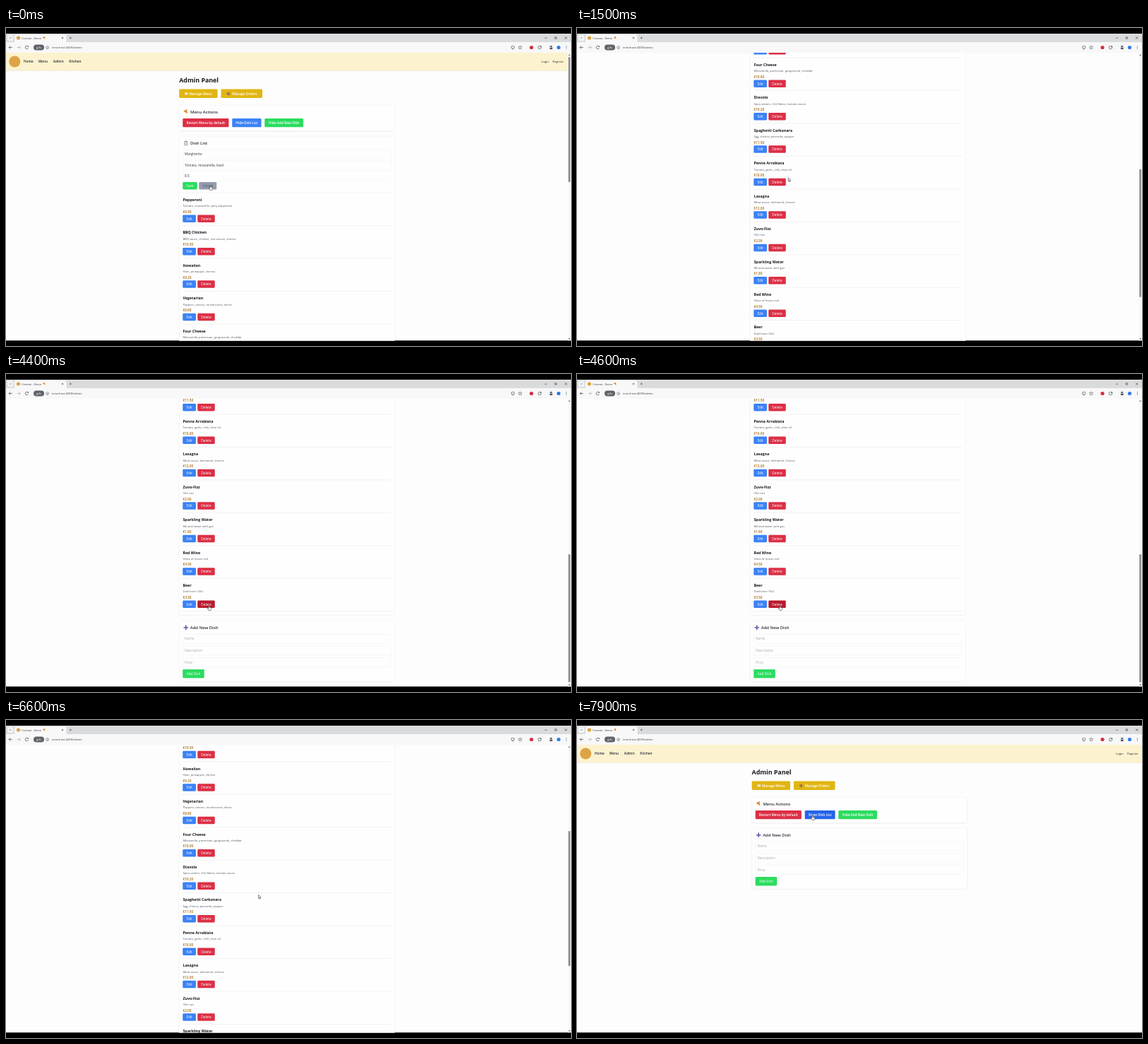
Recreate the animation shown at these times as an HTML page with a canvas. Size 800 by 450 pixels, loop 8000 ms.

```html
<!DOCTYPE html>
<html lang="en">
<head>
<meta charset="utf-8">
<title>Admin Panel</title>
<style>
html, body { margin: 0; width: 100%; height: 100%; overflow: hidden; background: #000; }
canvas { display: block; width: 800px; height: 450px; }
</style>
</head>
<body>
<canvas id="stage" width="800" height="450"></canvas>
<script>
const ctx = document.getElementById('stage').getContext('2d');
const LOOP = 8000, STEP = 100;
const TOP = 35, BOTTOM = 442.5, PITCH = 46.44;
const SMALL = 4.13, BODY = 4.72, LARGE = 5.3, HEADING = 5.9;
const HOST = 'innerhost:4200';
const RED = '#dc2f45', BLUE = '#3b82f6', GREEN = '#2bdc5f', YELLOW = '#e1b512', GRAY = '#9ca3af';
const HOVER = { [RED]: '#b91c2f', [BLUE]: '#2563eb', [GREEN]: '#20b851', [YELLOW]: '#c99c0c', [GRAY]: '#949cab' };
const INK = '#1b1f27';

const dishes = [
  ['Margherita', 'Tomato, mozzarella, basil', '8.50'],
  ['Pepperoni', 'Tomato, mozzarella, spicy pepperoni', '9.90'],
  ['BBQ Chicken', 'BBQ sauce, chicken, red onions, cheese', '10.50'],
  ['Hawaiian', 'Ham, pineapple, cheese', '9.20'],
  ['Vegetarian', 'Peppers, onions, mushrooms, olives', '8.80'],
  ['Four Cheese', 'Mozzarella, parmesan, gorgonzola, cheddar', '10.00'],
  ['Diavola', 'Spicy salami, chili flakes, tomato sauce', '10.20'],
  ['Spaghetti Carbonara', 'Egg, cheese, pancetta, pepper', '11.50'],
  ['Penne Arrabiata', 'Tomato, garlic, chili, olive oil', '10.00'],
  ['Lasagna', 'Meat sauce, béchamel, cheese', '12.00'],
  ['Zuvo-Fizz', '33cl can', '2.00'],
  ['Sparkling Water', 'Mineral water with gas', '1.80'],
  ['Red Wine', 'Glass of house red', '4.50'],
  ['Beer', 'Draft beer 50cl', '3.50']
];

// Timeline: [time, value...]
const scrollKeys = [[0, 0], [700, 0], [900, 58.2], [1750, 481], [5999, 481], [6000, 434.6], [6250, 434.6], [6600, 247], [7050, 0]];
const cursorKeys = [
  [0, 289.5, 223], [300, 289.5, 223], [800, 292.5, 215], [1800, 302, 210.5], [2200, 262, 309],
  [2500, 273.8, 395], [3100, 285, 408], [3500, 276, 380], [4200, 287.5, 328], [4700, 287.5, 328],
  [5600, 445, 69], [6000, 445, 69], [6400, 357.5, 247.5], [6950, 357.5, 247.5], [7500, 333.5, 135]
];
const CANCEL_AT = 300, ALERT_AT = 4800, CLOSE_AT = 6000, HIDE_AT = 7900;

const pointer = { x: 0, y: 0, kind: 'arrow', active: true };
let scroll = 0;

function sample(keys, t) {
  const next = keys.findIndex(k => k[0] > t);
  if (next < 0) return keys[keys.length - 1].slice(1);
  const a = keys[next - 1], b = keys[next], p = (t - a[0]) / (b[0] - a[0]);
  return a.slice(1).map((v, i) => v + (b[i + 1] - v) * p);
}

function text(str, x, cy, size, color = INK, weight = 400, align = 'left') {
  ctx.font = `${weight} ${size}px "Open Sans", "Noto Sans", sans-serif`;
  ctx.fillStyle = color;
  ctx.textAlign = align;
  ctx.fillText(str, x, cy + size * 0.36);
}

function box(x, y, w, h, r, fill, stroke, width = 0.5) {
  ctx.beginPath();
  ctx.roundRect(x, y, w, h, r);
  if (fill) { ctx.fillStyle = fill; ctx.fill(); }
  if (stroke) { ctx.strokeStyle = stroke; ctx.lineWidth = width; ctx.stroke(); }
}

function disc(x, y, r, fill) {
  ctx.beginPath();
  ctx.arc(x, y, r, 0, Math.PI * 2);
  ctx.fillStyle = fill;
  ctx.fill();
}

function poly(points, fill, stroke, width = 0.6) {
  ctx.beginPath();
  points.forEach(([x, y]) => ctx.lineTo(x, y));
  if (fill) { ctx.closePath(); ctx.fillStyle = fill; ctx.fill(); }
  if (stroke) { ctx.strokeStyle = stroke; ctx.lineWidth = width; ctx.stroke(); }
}

const line = (x1, y1, x2, y2, color, width) => poly([[x1, y1], [x2, y2]], null, color, width);

function hit(x, y, w, h, kind) {
  const py = pointer.y + scroll;
  const inside = pointer.active && pointer.x >= x && pointer.x <= x + w && py >= y && py <= y + h;
  if (inside) pointer.kind = kind;
  return inside;
}

function button(label, x, y, w, h, color, { weight = 400, ink = '#fff', shift = 0 } = {}) {
  const over = hit(x, y, w, h, 'hand');
  box(x, y, w, h, 1.4, over ? HOVER[color] : color);
  text(label, x + w / 2 + shift, y + h / 2 + 0.2, BODY, ink, weight, 'center');
}

function field(x, cy, str, color) {
  hit(x, cy - 6.5, 295, 13, 'beam');
  box(x, cy - 6.5, 295, 13, 1.3, '#fefefe', '#eeeff1');
  text(str, x + 2.8, cy, BODY, color);
}

function card(x, y, h) {
  box(x, y + 0.6, 305, h, 2, '#f1f1f2');
  box(x, y, 305, h, 2, '#fefefe', '#ebecee');
}

function pizza(x, y, s) {
  poly([[x - s, y - s * 0.3], [x + s * 0.5, y - s], [x + s * 0.8, y + s]], '#f3b33c');
  line(x - s, y - s * 0.3, x + s * 0.5, y - s, '#c47a2c', s * 0.4);
  disc(x, y - s * 0.2, s * 0.25, '#d8452f');
  disc(x + s * 0.4, y + s * 0.25, s * 0.2, '#d8452f');
}

function clipboard(x, y) {
  box(x - 2.4, y - 2.8, 4.8, 6, 0.5, '#a8705a');
  box(x - 1.8, y - 2, 3.6, 4.7, 0.2, '#eceef2');
  box(x - 1.1, y - 3.3, 2.2, 1.5, 0.4, '#737a86');
  for (let i = 0; i < 3; i++) line(x - 1.2, y - 0.6 + i * 1.1, x + 1.2, y - 0.6 + i * 1.1, '#9aa0ac', 0.4);
}

function plus(x, y) {
  line(x - 3.2, y, x + 3.2, y, '#6a55a8', 1.6);
  line(x, y - 3.2, x, y + 3.2, '#6a55a8', 1.6);
}

function navBar(right) {
  box(0, TOP, right, 25.3, 0, '#fdf2cf');
  line(0, 60.4, right, 60.4, '#e9e4d4', 0.6);
  disc(12.3, 47.5, 8, '#dda445');
  [['Home', 25], ['Menu', 46], ['Admin', 66.8], ['Kitchen', 89.3]].forEach(([s, x]) => text(s, x, 47.8, BODY, '#2b2f36', 600));
  text('Login', right - 37, 47.8, 4.25, '#2b2f36', 500);
  text('Register', right - 21, 47.8, 4.25, '#2b2f36', 500);
}

function actions(x, listShown) {
  const bold = { weight: 600 };
  text('Admin Panel', x, 74, 8.85, '#15181e', 700);
  button('Manage Menu', x, 86.5, 54.3, 12.5, YELLOW, { weight: 600, shift: 3.3 });
  box(x + 8, 91.2, 4.2, 3.4, 0.4, '#f5f1e4');
  line(x + 10.1, 91.2, x + 10.1, 94.6, '#a8a596', 0.4);
  button('Manage Orders', x + 59.3, 86.5, 58.5, 12.5, YELLOW, { weight: 600, shift: 4 });
  box(x + 67.5, 91, 4, 3.6, 0.5, '#a8794f');
  disc(x + 70.5, 94.3, 0.9, '#4f5a75');

  card(x, 109, 36.8);
  pizza(x + 9.5, 118.8, 2.9);
  text('Menu Actions', x + 15.8, 118.7, HEADING, '#2a2e36', 600);
  button('Restart Menu by default', x + 5, 128, 65.2, 12.3, RED, bold);
  const w = listShown ? 41.3 : 42.9;
  button((listShown ? 'Hide' : 'Show') + ' Dish List', x + 75, 128, w, 12.3, BLUE, bold);
  button('Hide Add New Dish', x + 79.7 + w, 128, 54.7, 12.3, GREEN, bold);
}

function dishList(x, count, editing) {
  const extra = editing ? 20.1 : 0;
  const bottom = 171.8 + count * PITCH + extra;
  card(x, 153, bottom - 153);
  clipboard(x + 9.6, 163);
  text('Dish List', x + 15.8, 162.8, HEADING, '#2a2e36', 600);
  for (let i = 0; i < count; i++) {
    const [name, detail, price] = dishes[i];
    const y = 176.4 + i * PITCH + extra;
    line(x + 5, y + 36.6, x + 300, y + 36.6, '#e9eaec', 0.6);
    if (editing && i === 0) {
      field(x + 5, 178.8, name, '#30343b');
      field(x + 5, 194.2, detail, '#30343b');
      field(x + 5, 209.6, '8.5', '#30343b');
      button('Save', x + 5, 218, 20.5, 10.5, GREEN);
      button('Cancel', x + 28, 218, 25, 10.5, GRAY, { ink: '#475060' });
      continue;
    }
    text(name, x + 5.2, y, LARGE, '#15181e', 700);
    text(detail, x + 5.2, y + 8.8, SMALL, '#555c68');
    text('€' + price, x + 5.2, y + 17.1, BODY, '#a06a14', 600);
    button('Edit', x + 5, y + 21.5, 18.7, 10.5, BLUE);
    button('Delete', x + 26, y + 21.5, 24.5, 10.5, RED);
  }
  return bottom;
}

function addForm(x, y) {
  card(x, y, 86.3);
  plus(x + 9.5, y + 9.8);
  text('Add New Dish', x + 15.6, y + 9.8, HEADING, '#2a2e36', 600);
  ['Name', 'Description', 'Price'].forEach((s, i) => field(x + 5, y + 25.8 + i * 16.6, s, '#a3a9b4'));
  button('Add Dish', x + 5, y + 69, 30.5, 12.4, GREEN);
}

function scrollbar(height) {
  const view = BOTTOM - TOP, track = 395;
  box(795, TOP, 5, view, 0, '#f9f9f9');
  poly([[796.2, 39], [799, 39], [797.6, 37]], '#6f6f6f');
  poly([[796.2, 439], [799, 439], [797.6, 441]], '#6f6f6f');
  box(796.3, 41 + scroll / height * track, 2.6, view / height * track, 1.3, '#8a8a8a');
}

function page(t) {
  const listShown = t < HIDE_AT;
  const x = listShown ? 245.2 : 247.6;
  ctx.save();
  ctx.beginPath();
  ctx.rect(0, TOP, 800, BOTTOM - TOP);
  ctx.clip();
  box(0, TOP, 800, BOTTOM - TOP, 0, '#fdfdfd');
  ctx.translate(0, -scroll);
  navBar(listShown ? 795 : 800);
  actions(x, listShown);
  const count = t < CLOSE_AT ? dishes.length : dishes.length - 1;
  const listEnd = listShown ? dishList(x, count, t < CANCEL_AT) : 145;
  addForm(x, listEnd + 8);
  ctx.translate(0, scroll);
  if (listShown) scrollbar(listEnd + 66);
  if (!pointer.active) box(0, TOP, 800, BOTTOM - TOP, 0, 'rgba(0,0,0,0.6)');
  ctx.restore();
}

function browserFrame() {
  const dark = '#3c4043';
  box(0, 8, 800, 12.5, 0, '#dadbdd');
  box(0, 20, 800, 15, 0, '#f8f8f9');
  box(2, 9.8, 8.4, 8.4, 2, '#f3f3f4');
  poly([[5, 13.4], [6.2, 14.6], [7.4, 13.4]], null, dark);
  box(12, 9.3, 73.5, 12, [3, 3, 0, 0], '#f8f8f9');
  disc(17.5, 14, 2.6, '#dda445');
  text('Crostavi - Demo', 22.2, 14.2, 3.75, '#33363a');
  pizza(54, 14.2, 1.9);
  line(78.8, 12.8, 81.2, 15.2, dark, 0.6);
  line(81.2, 12.8, 78.8, 15.2, dark, 0.6);
  line(89.8, 14, 92.8, 14, dark, 0.6);
  line(91.3, 12.5, 91.3, 15.5, dark, 0.6);
  line(762.8, 14.2, 765.8, 14.2, dark, 0.7);
  box(777.2, 12.8, 2.4, 2.4, 0.4, null, dark, 0.7);
  line(791.2, 12.5, 794.2, 15.5, dark, 0.7);
  line(794.2, 12.5, 791.2, 15.5, dark, 0.7);

  [[6.5, -1, dark], [18, 1, '#a2a5a9']].forEach(([x, d, c]) => {
    line(x - 2.3, 27.5, x + 2.3, 27.5, c, 0.7);
    poly([[x + d * 0.4, 25.5], [x + d * 2.3, 27.5], [x + d * 0.4, 29.5]], null, c, 0.7);
  });
  ctx.beginPath();
  ctx.arc(29.4, 27.5, 2.2, 0.4, 5.6);
  ctx.strokeStyle = dark;
  ctx.lineWidth = 0.7;
  ctx.stroke();
  poly([[30.2, 26.8], [32, 26.8], [32, 24.9]], dark);
  box(39, 23.4, 15, 8.2, 4, '#5f6368');
  text('gifs', 46.5, 27.5, 4.2, '#fff', 500, 'center');
  box(56.7, 25.7, 3.8, 3.8, 1.9, null, dark, 0.5);
  line(58.6, 27.2, 58.6, 28.7, dark, 0.5);
  text(HOST + '/admin', 65, 27.6, 4.13, '#3b3e42');

  box(715.6, 25.6, 4, 3.2, 0.5, null, dark, 0.6);
  line(716.6, 30, 718.8, 30, dark, 0.6);
  poly(Array.from({ length: 11 }, (_, i) => {
    const r = i % 2 ? 1.2 : 2.7, a = i * Math.PI / 5 - Math.PI / 2;
    return [728 + r * Math.cos(a), 27.6 + r * Math.sin(a)];
  }), null, dark, 0.5);
  disc(744, 27.5, 2.6, '#d32f3e');
  box(753.5, 25.6, 4, 4, 1, null, dark, 0.6);
  disc(757.4, 26.4, 0.8, dark);
  disc(771.8, 27.5, 3.2, '#dfe1e5');
  disc(771.8, 26.3, 1.2, '#4b5159');
  box(769.9, 27.9, 3.8, 2, 0.9, '#4b5159');
  disc(782.5, 27.5, 2.6, '#2f7de1');
  for (let i = -1; i < 2; i++) disc(793.3, 27.5 + i * 1.8, 0.5, dark);
}

function alertBox() {
  ctx.save();
  ctx.shadowColor = 'rgba(0,0,0,0.4)';
  ctx.shadowBlur = 4;
  box(330, 34.2, 140, 45, [1, 1, 4, 4], '#fff');
  ctx.restore();
  text(HOST + ' dice', 336.2, 44, 4.75, '#26292d', 600);
  text('Dish deleted!', 336.2, 53.2, 3.9, '#44474c');
  box(439.2, 60.6, 25.4, 13, 6.5, '#fff', '#0b57d0', 0.9);
  box(440.6, 62, 22.6, 10.2, 5.1, '#0b57d0');
  text('Aceptar', 451.9, 67.2, 3.9, '#fff', 600, 'center');
}

function drawPointer() {
  ctx.save();
  ctx.translate(pointer.x, pointer.y);
  ctx.lineJoin = 'round';
  if (pointer.kind === 'beam') {
    line(0, -2.8, 0, 2.8, '#222', 0.7);
    line(-1.4, -2.8, 1.4, -2.8, '#222', 0.6);
    line(-1.4, 2.8, 1.4, 2.8, '#222', 0.6);
  } else if (pointer.kind === 'hand') {
    const shape = [[-0.6, 0], [0.5, 0], [0.6, 2.1], [3, 2.7], [3.2, 4.5], [2.4, 6.4], [-0.6, 6.4], [-2.3, 3.8], [-1.6, 3.3], [-0.6, 4], [-0.6, 0]];
    poly(shape, '#fff', '#333', 0.6);
  } else {
    poly([[0, 0], [0, 5], [1.1, 4], [1.9, 5.8], [2.7, 5.4], [2, 3.7], [3.5, 3.6], [0, 0]], '#fff', '#333', 0.6);
  }
  ctx.restore();
}

function draw(now) {
  const t = Math.floor((now % LOOP) / STEP) * STEP;
  const alerting = t >= ALERT_AT && t < CLOSE_AT;
  [scroll] = sample(scrollKeys, t);
  [pointer.x, pointer.y] = sample(cursorKeys, t);
  pointer.kind = 'arrow';
  pointer.active = !alerting;

  box(0, 0, 800, 450, 0, '#000');
  page(t);
  browserFrame();
  if (alerting) alertBox();
  drawPointer();
}

const start = performance.now();
function tick() {
  draw(performance.now() - start);
  requestAnimationFrame(tick);
}
tick();
</script>
</body>
</html>
```
